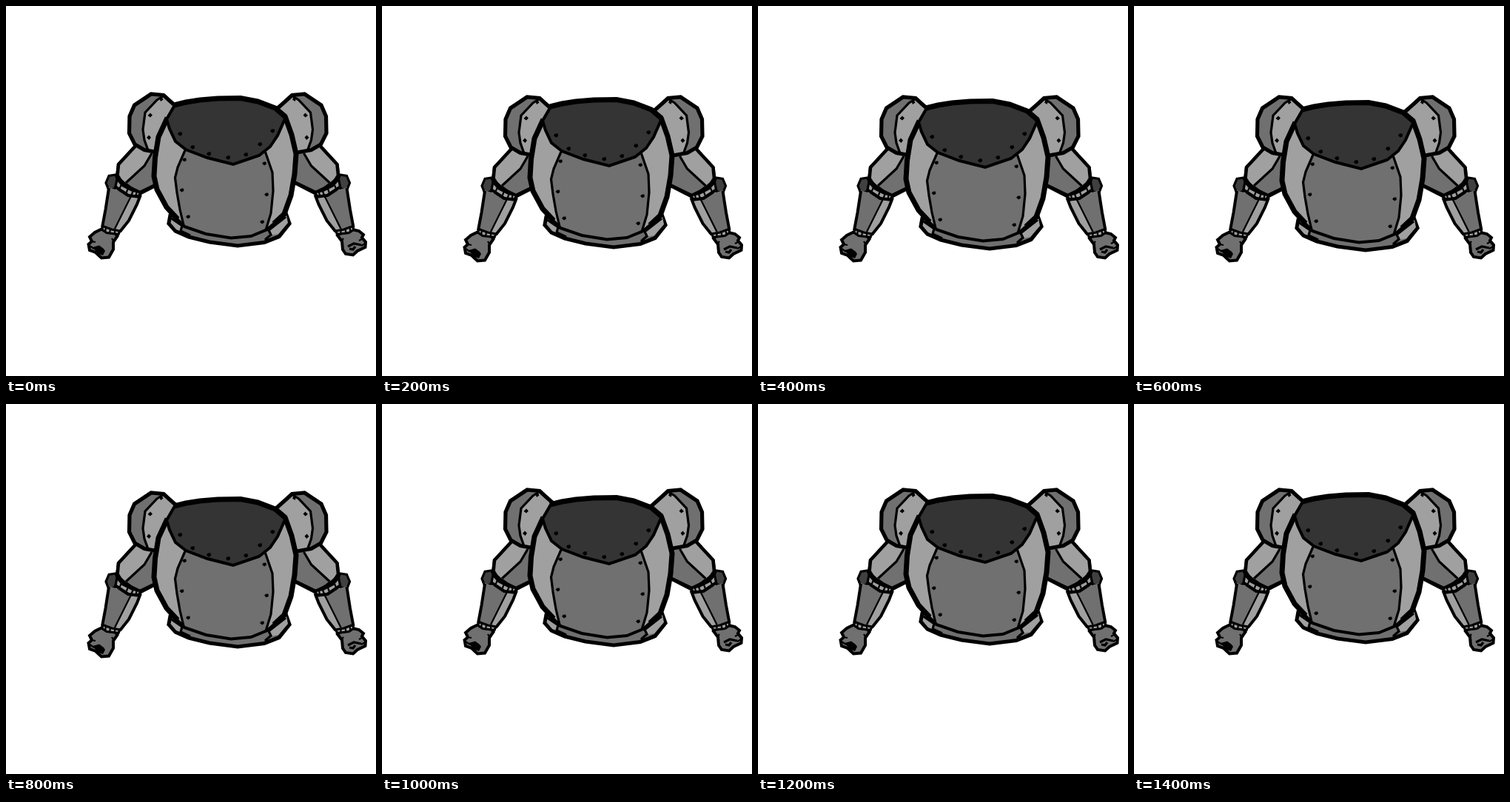
These frames come from a looping animation (500x500 px, 1.6 s). An HTML page:

```html
<!DOCTYPE html>
<html lang="en">
<head>
<meta charset="utf-8">
<title>Armour idle</title>
<style>
  html, body { margin: 0; width: 100%; height: 100%; overflow: hidden; background: #fff; }
  svg { display: block; width: 100%; height: 100%; }
  path { stroke: #000; stroke-linejoin: miter; stroke-miterlimit: 3; fill: none; }
  .mid { fill: #707070; }
  .light { fill: #a0a0a0; }
  .dark { fill: #343434; }
  .pad { fill: #404040; }
  .flat { stroke: none; }
  .fine { stroke-width: 2.2; }
  .thin { stroke-width: 3.2; }
  .line { stroke-width: 4; }
  .bold { stroke-width: 5.2; }
  .heavy { stroke-width: 7; }
  .ink { fill: #000; stroke: none; }
</style>
</head>
<body>
<svg viewBox="0 0 500 500">
  <defs>
    <g id="arm">
      <path class="ink" d="M174 187 150 214 148 230 156 244 168 255 181 256 216 238 216 192Z"/>
      <!-- elbow pad and forearm -->
      <path class="pad thin" d="M139 229.500 135 239 138.500 248 147 247 151 236 148 228Z"/>
      <path class="light flat" d="M168 254 157 281 147 302 155 305 166 290 177 268 182 254Z"/>
      <path class="mid flat" d="M139 245 134 275 130 298 148 302 158 281 169 255Z"/>
      <path class="fine" d="M169 257 157 281 147 301"/>
      <path class="line" d="M139 246 134.500 275 130 299M154 305 166 290 177 268 182 255"/>
      <!-- upper arm -->
      <path class="mid flat" d="M198 198 188 216 163 239 180 252 216 236V196Z"/>
      <path class="light flat" d="M175 189 151.500 214 152 230 163 240 188 216 199 197Z"/>
      <path class="thin" d="M197 199 187 216 162 239"/>
      <path class="bold" style="stroke-width:4.600" d="M176 188 152 214 150.500 229 158 241 181 252 214 236"/>
      <!-- elbow cuff -->
      <path class="light thin" d="M150 234 158 243 170 249 182 252 179 257 166 256 148 244Z"/>
      <path class="line" d="M147 244 165 256 181 258"/>
      <path class="fine" d="M156 241 153 248M165 246 162 254M172 249 169 257M177 250 175 258"/>
      <!-- shoulder -->
      <path class="mid flat" d="M196 119 173 134 166 149 165 172 173 187 192 195 200 160 213 121Z"/>
      <path class="light flat" d="M213 122 204 127 188 144 185 167 188 181 192 195 212 198 238 175 238 142 220 126Z"/>
      <path class="thin" d="M212 122 204 127 188 144 185 167 187 181 192 195"/>
      <path class="bold" d="M238 143 220 127 213 120.500 196 119 173.500 134 167 149 166.500 172 174 187 187 194.500 212 199"/>
      <path class="ink" d="M207.500 125l3.300-1.500 1.700 3-3.500 2.500zM191.500 148l3.500-3.500 3 3-3 3zM190 178l3-3.500 3 3-2.500 3.500z"/>
    </g>
    <g id="cuff">
      <path class="light thin" d="M131 297.500 129.500 302 136 306.500 152 308.500 154 304 143 302Z"/>
      <path class="fine" d="M135 299 134 306M141 301 140 308M147 302 147 309"/>
    </g>
  </defs>

  <g id="arms">
    <g>
      <path class="mid line" d="M130 301 120 306 113 312 116 318 111.500 322 113 330 121 333 129 340.500 139 339.500 145 329 145 319 150.500 311 147 306Z"/>
      <path class="ink" d="M117 326 126 323.500 132 328 134 331 131 337 125 335 121 331Z"/>
      <path class="fine" d="M115 318 121 319M113 324 119 328M146 319 143 314"/>
      <use href="#arm"/><use href="#cuff"/>
    </g>
    <g>
      <path class="mid line" d="M468 302 477 304 483 309 481 313 486 319 485.500 326 475 331 469 336.500 459 335 455 329 454 318 448 310 453 306Z"/>
      <path class="thin" d="M462 325 470 321 480 323M472 325 469 329 464 328"/>
      <path class="fine" d="M483 314 477 317M487 320 480 324M453 318 456 314"/>
      <g transform="matrix(-1 0 0 1 599.500 0)">
        <use href="#arm"/><use href="#cuff"/>
      </g>
    </g>
  </g>

  <g id="torso">
    <!-- belt -->
    <path class="mid bold" d="M222 283 220 294 229 304 247 312 275 319 313 324 349 319.500 369 311.500 383 294 378 280 300 270Z"/>
    <path class="light flat" d="M224 286 222.500 293 230 302 235 304 238 296Z"/>
    <path class="light flat" d="M379 283 381 293 368 308 358 310 355 302Z"/>
    <path class="thin" d="M222 286 238 297 236 304 249 310M378 285 355 303 358 309 350 316"/>
    <!-- body -->
    <path class="light flat" d="M228 134 219 150 206 176 201 230 204 249 217 273 241 299 270 309 305 314 351 303 378 282 388 255 394 200 378 150 320 125Z"/>
    <path class="mid flat" d="M242 194 232 218 228 232 231 252 235 275 240 296 270 308 305 314 352 303 358 280 361 250 360 225 350 196 307 213Z"/>
    <path class="thin" d="M242 195 232 218 228.500 232 231 252 235 275 240 296M350 196 360 225 361 250 358 280 351 303"/>
    <path class="line" d="M216 272 241 298 270 308 304 313.500 331 311 353 302 378 280"/>
    <path class="heavy" d="M218 151 206 177 201.500 205 200 230 204 248 217 272 232 288"/>
    <path class="heavy" d="M377 149 386 174 392 200 390 227 385 256 376 281 362 294"/>
    <!-- collar -->
    <path class="dark line" d="M228 134 217 153 221 166 229 183 243 194 272 205 307 214 342 202 357 190 367 175 378 150 364 138 340 129 317 125 286 125 262 128Z"/>
    <path class="heavy" d="M227 134 243 130 262 127 286 125 317 124.500 340 129 364 138 378 150"/>
    <g id="rivets"></g>
  </g>
</svg>
<script>
  const LOOP = 1600;
  const armSteps = [0, 4, 4, 4, 1, -3, -3, -3];
  const torsoSteps = [0, 2, 4, 6, 4, 2, 0, -2];
  const collar = [[235, 173], [252, 191], [274, 200], [300, 205], [324, 201], [343, 187], [360, 169]];
  const plate = [[241, 208], [237.5, 249], [246, 285], [349, 213], [352, 255], [346, 292]];
  const byId = id => document.getElementById(id);

  function rivet([x, y], r) {
    const p = document.createElementNS("http://www.w3.org/2000/svg", "path");
    p.setAttribute("class", "ink");
    p.setAttribute("d", `M${x - r} ${y}l${r * 0.6} ${-r * 0.8} ${r * 1.2} ${-r * 0.1} ${r * 0.2} ${r * 1.2} ${-r} ${r * 0.6}z`);
    byId("rivets").append(p);
  }

  function bob(id, steps) {
    const frames = [...steps, steps[0]].map((y, i) => ({
      offset: i / steps.length,
      transform: `translate(0px, ${y}px)`,
      easing: "step-end"
    }));
    byId(id).animate(frames, { duration: LOOP, iterations: Infinity });
  }

  collar.forEach(p => rivet(p, 3.1));
  plate.forEach(p => rivet(p, 2.9));
  bob("arms", armSteps);
  bob("torso", torsoSteps);
</script>
</body>
</html>
```
